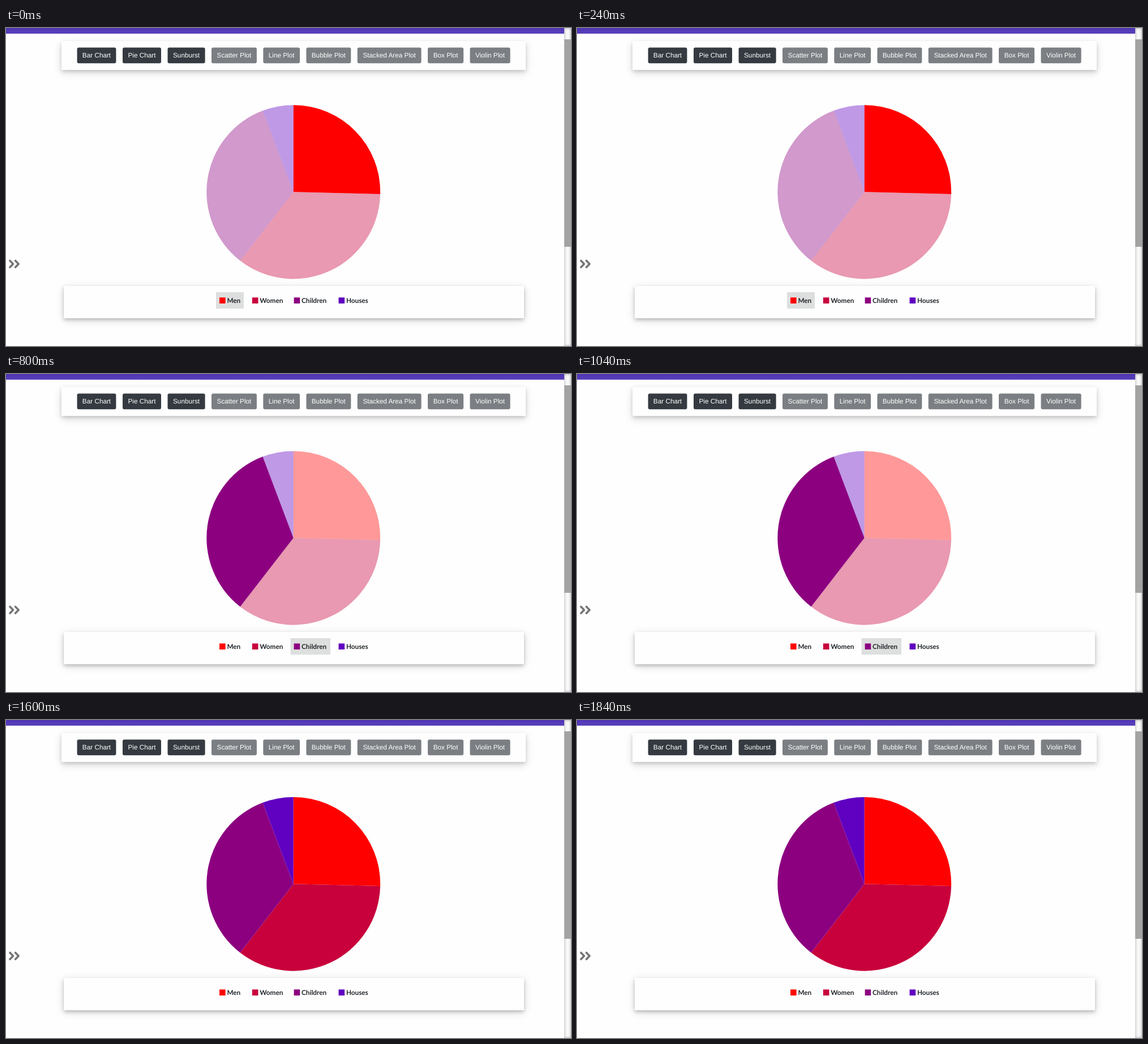
Recreate the animation shown at these times as an HTML page. Size 998 by 561 pixels, loop 2000 ms.

```html
<!DOCTYPE html>
<html lang="en">
<head>
<meta charset="utf-8">
<title>Pie chart legend</title>
<style>
html, body { margin: 0; width: 100%; height: 100%; overflow: hidden; background: #fefefe; }
#stage { position: relative; width: 998px; height: 561px; overflow: hidden; }
#stage > * { position: absolute; }
.panel { background: #fefefe; }
#tools { left: 98px; top: 23px; width: 819.5px; height: 50.5px;
  box-shadow: 0 3px 6px rgba(0,0,0,.14), 0 5px 14px rgba(0,0,0,.14); }
#legend { left: 101.5px; top: 454.5px; width: 813px; height: 57.5px;
  box-shadow: 0 3px 6px rgba(0,0,0,.2), 0 4.4px 14.7px rgba(0,0,0,.15); }
#bar { left: 0; top: 0; width: 986px; height: 10px; background: linear-gradient(#5035b3, #5a40bb); }
#track { left: 986px; top: 0; width: 12px; height: 561px; background: #fafafa;
  box-shadow: inset 0 0 5px rgba(0,0,0,.35); }
#thumb { left: 986px; top: 20px; width: 12px; height: 366px; background: #a3a3a3; }
svg { left: 0; top: 0; }
text { text-rendering: geometricPrecision; }
.btn { font: 11.76px "Liberation Sans", Arial, sans-serif; fill: #fff; text-anchor: middle; }
.key { font: 700 11.76px Lato, sans-serif; fill: #212529; }
</style>
</head>
<body>
<div id="stage">
  <div id="tools" class="panel"></div>
  <div id="legend" class="panel"></div>
  <div id="bar"></div>
  <div id="track"></div>
  <div id="thumb"></div>
  <svg id="art" width="998" height="561" viewBox="0 0 998 561">
    <g fill="none" stroke="#757575" stroke-width="3.6" stroke-linecap="round" stroke-linejoin="round">
      <path d="M7 410.5L12.6 416.2L7 422"/>
      <path d="M16.6 410.5L22.2 416.2L16.6 422"/>
    </g>
  </svg>
</div>
<script>
const art = document.getElementById('art');
const HOLD = 400, DIM = 0.4;
const CX = 507.7, CY = 289.3, R = 153.4;

const buttons = [
  ['Bar Chart', 125.6, 194.4], ['Pie Chart', 206, 274], ['Sunburst', 285.5, 351.6],
  ['Scatter Plot', 363, 442.9], ['Line Plot', 454.3, 519], ['Bubble Plot', 530.4, 609.3],
  ['Stacked Area Plot', 620.7, 733.6], ['Box Plot', 745, 808.1], ['Violin Plot', 819.5, 890.6]
];

// end: clockwise angle from the top, in degrees
const groups = [
  { name: 'Men', color: '#ff0000', end: 91.4, x: 371, w: 49 },
  { name: 'Women', color: '#c8003c', end: 217.8, x: 428.8, w: 65.2 },
  { name: 'Children', color: '#8c0080', end: 339.3, x: 502.6, w: 70.4 },
  { name: 'Houses', color: '#6000c0', end: 360, x: 581.5, w: 63 }
];

function add(tag, attrs, label) {
  const el = document.createElementNS(art.namespaceURI, tag);
  for (const k in attrs) el.setAttribute(k, attrs[k]);
  if (label) el.textContent = label;
  return art.appendChild(el);
}

function rim(deg) {
  const a = deg * Math.PI / 180;
  return (CX + R * Math.sin(a)).toFixed(2) + ' ' + (CY - R * Math.cos(a)).toFixed(2);
}

buttons.forEach(([label, x0, x1], i) => {
  add('rect', { x: x0, y: 34.4, width: x1 - x0, height: 27.8, rx: 2.9, fill: i < 3 ? '#343a40' : '#7b7f83' });
  add('text', { class: 'btn', x: (x0 + x1) / 2, y: 52 }, label);
});

let start = 0;
for (const g of groups) {
  g.slice = add('path', { d: `M${CX} ${CY}L${rim(start)}A${R} ${R} 0 0 1 ${rim(g.end)}Z`, fill: g.color });
  start = g.end;
  g.mark = add('rect', { x: g.x, y: 466, width: g.w, height: 29, fill: '#dddfde' });
  add('rect', { x: g.x + 6, y: 475.4, width: 10.6, height: 10.6, fill: g.color });
  add('text', { class: 'key', x: g.x + 19.4, y: 485 }, g.name);
}

// Each group is highlighted in turn, then all are shown together.
function draw(ms) {
  const active = Math.floor(ms / HOLD) % (groups.length + 1);
  groups.forEach((g, i) => {
    g.slice.setAttribute('opacity', active === i || active === groups.length ? 1 : DIM);
    g.mark.setAttribute('visibility', active === i ? 'visible' : 'hidden');
  });
}

let t0;
function tick(now) {
  t0 ??= now;
  draw(now - t0);
  requestAnimationFrame(tick);
}
draw(0);
requestAnimationFrame(tick);
</script>
</body>
</html>
```
